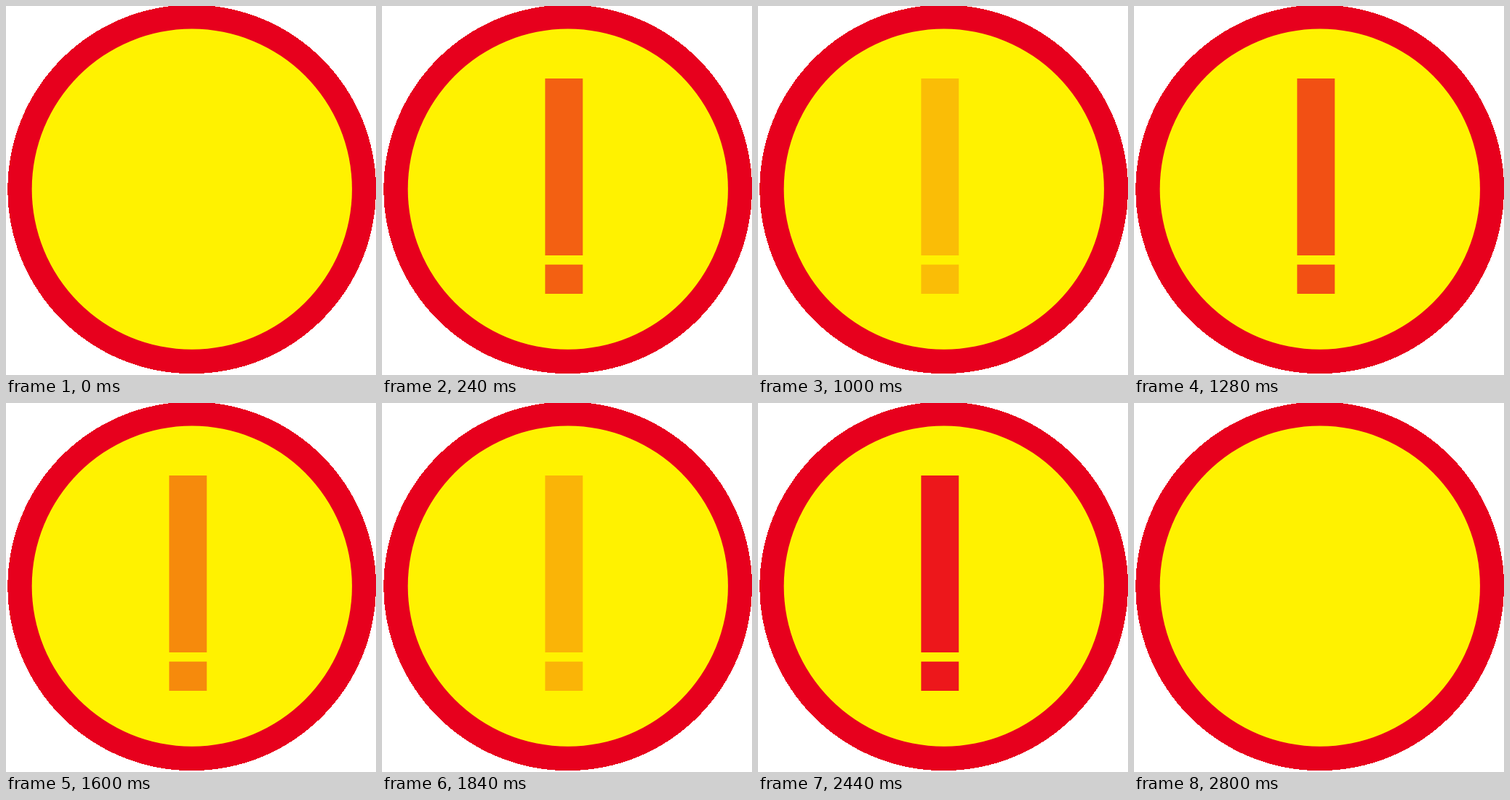
Write an HTML page that moves like this. It is 511 px wide and 509 px high and loops after 3000 ms.

```html
<!DOCTYPE html>
<html lang="en">
<head>
<meta charset="utf-8">
<title>Blinking warning sign</title>
<style>
  html, body { margin: 0; width: 100%; height: 100%; overflow: hidden; background: #fff; }
  svg { display: block; width: 100%; height: 100%; }
  .soft { filter: blur(.5px); }
</style>
</head>
<body>
<svg viewBox="0 0 511 509">
  <circle cx="256.7" cy="252.8" r="254.4" fill="#e7001d" shape-rendering="crispEdges"/>
  <circle class="soft" cx="256.8" cy="252.7" r="221.1" fill="#fff200"/>
  <g id="mark" class="soft" fill="#ec001e" opacity="0">
    <rect x="225.3" y="100" width="52" height="244"/>
    <rect x="225.3" y="356.7" width="52" height="40.3"/>
  </g>
</svg>
<script>
  const LOOP = 3000, STEP = 40;
  const mark = document.getElementById('mark');

  // Linear rise and fall around a full hold; zero outside start..end.
  const pulse = (t, start, rise, fall, end) =>
    Math.max(0, Math.min(1, (t - start) / rise, (end - t) / fall));

  function draw() {
    const t = Math.floor(performance.now() % LOOP / STEP) * STEP;
    const opacity = pulse(t, 0, 400, 560, 1120)
      + pulse(t, 1120, 240, 280, 1720)
      + pulse(t, 1720, 480, 400, 2800);
    mark.setAttribute('opacity', opacity);
    requestAnimationFrame(draw);
  }
  draw();
</script>
</body>
</html>
```
